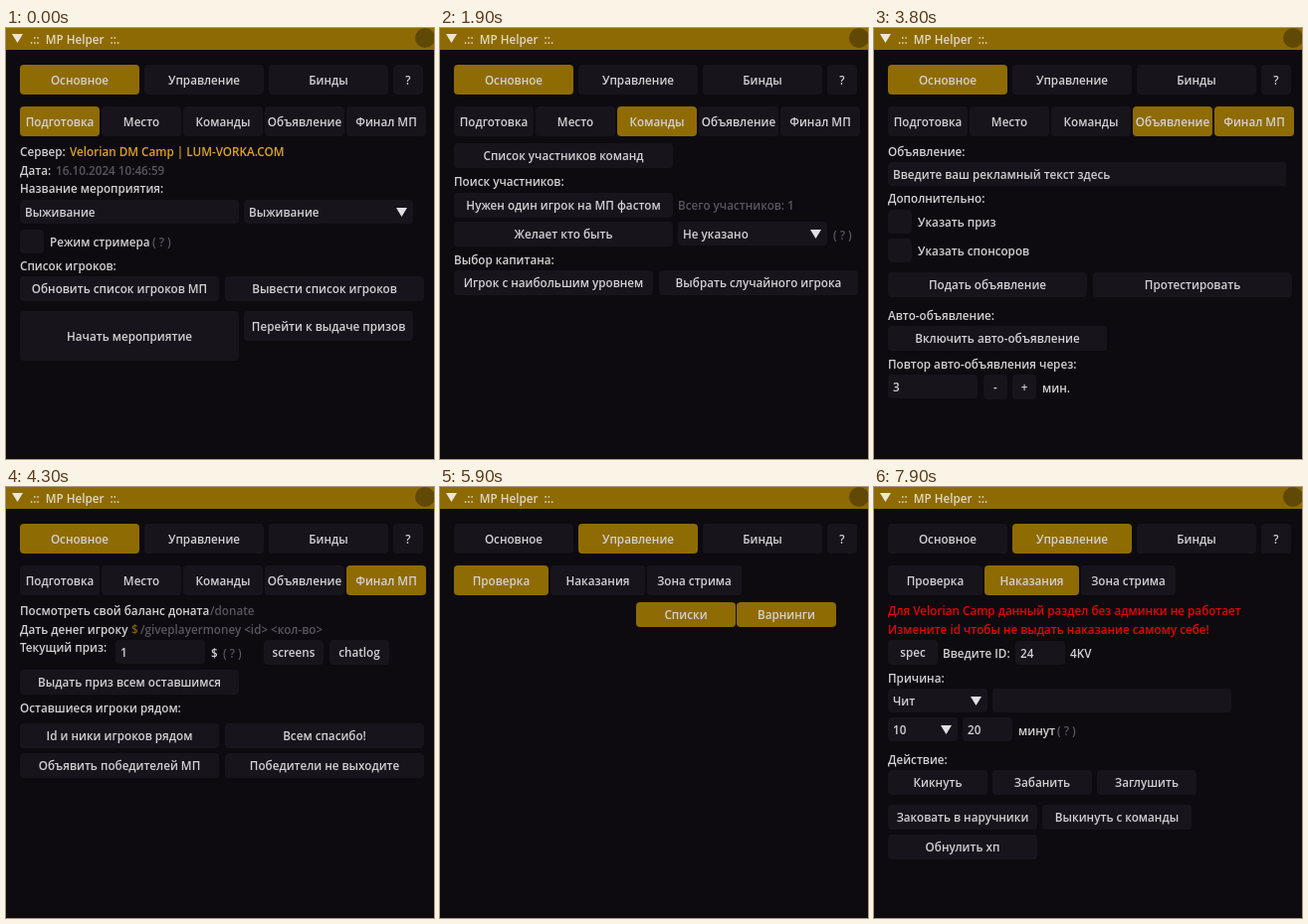
Write an HTML page that moves like this. It is 430 px wide and 434 px high and loops after 8000 ms.

```html
<!DOCTYPE html>
<html lang="ru">
<head>
<meta charset="utf-8">
<title>MP Helper</title>
<style>
html, body { margin: 0; width: 100%; height: 100%; overflow: hidden; background: #0d0b10; }
#stage { position: relative; width: 430px; height: 434px; overflow: hidden; background: #0d0b10;
  font: 600 11.7px/16px "Open Sans", "Noto Sans", sans-serif; color: #d2d0d2; }
#stage div { position: absolute; white-space: pre; }
#stage svg { position: absolute; left: 0; top: 0; }
.box { background: #17141c; border-radius: 4px; }
.btn { text-align: center; }
.page { left: 0; top: 0; width: 430px; height: 434px; }
</style>
</head>
<body>
<div id="stage"></div>
<script>
const LOOP = 8000, FADE = 200, STEP = 100;
const DARK = [23, 20, 28], GOLD = [143, 107, 4], LIGHT = [150, 147, 152];
const DIM = '#59565e', AMBER = '#dda51f', RED = '#e80404';
const stage = document.getElementById('stage');
const tabs = [], pages = [];
let root = stage;

function add(cls, x, y, w, h, str = '') {
  const el = document.createElement('div');
  el.className = cls;
  el.style.cssText = `left:${x}px;top:${y}px;width:${w}px;height:${h}px;line-height:${h}px`;
  el.textContent = str;
  root.append(el);
  return el;
}

// y is the middle of the line
function text(x, y, str, color = '') {
  const el = add('', x, y - 8, 0, 16, str);
  el.style.color = color;
  return el;
}

function shape(d, attrs) {
  root.insertAdjacentHTML('beforeend',
    `<svg width="430" height="434"><path d="${d}" ${attrs}/></svg>`);
}

const button = (x, y, w, str, h = 25) => add('box btn', x, y, w, h, str);
const hint = (x, y) => text(x, y, '( ? )', DIM);
const arrow = (x, y) => shape(`M${x - 5} ${y - 4}h11l-5.5 9z`, 'fill="#e2e0e2"');

function input(x, y, w, str) {
  add('box', x, y, w, 24);
  text(x + 5, y + 12, str);
}

function combo(x, y, w, str) {
  input(x, y, w, str);
  arrow(x + w - 12, y + 12);
}

function check(y, str, on) {
  add('box', 14, y, 24, 24);
  if (on) shape(`M19 ${y + 13}l5 5l10 -12`, 'fill="none" stroke="#a87c0a" stroke-width="2.8"');
  text(44, y + 12, str);
}

function pair(y, left, right) {
  button(14, y, 200, left);
  button(220, y, 200, right);
}

// Gold from `on` to `off`, with a light flash at `press`
function tab(x, y, w, h, str, on = Infinity, off = Infinity, press = Infinity) {
  tabs.push({ el: button(x, y, w, str, h), on, off, press });
}

function page(from, to, build) {
  const el = add('page', 0, 0, 430, 434);
  pages.push({ el, from, to });
  const outer = root;
  root = el;
  build();
  root = outer;
}

// Title bar
add('', 0, 0, 430, 22).style.background = '#8d6a03';
add('', 411, 0, 20, 20).style.cssText += ';background:#604805;border-radius:50%';
shape('M6 6h11l-5.5 9z', 'fill="#ece6d8"');
text(24, 11, '.::  MP Helper  ::.', '#e0d8c4');

tab(14, 37, 120, 30, 'Основное', -FADE, 4900);
tab(139, 37, 120, 30, 'Управление', 4450, Infinity, 4750);
tab(264, 37, 120, 30, 'Бинды');
tab(389, 37, 30, 30, '?');

page(0, 4900, () => {
  tab(14, 79, 80, 30, 'Подготовка', -FADE, 1100);
  tab(96, 79, 80, 30, 'Место', 600, 1700, 1000);
  tab(178, 79, 80, 30, 'Команды', 1300, 3000, 1600);
  tab(260, 79, 80, 30, 'Объявление', 2300, 4000, 2900);
  tab(342, 79, 80, 30, 'Финал МП', 3500, Infinity, 3920);
});

let clock;
page(0, 1100, () => {
  text(14, 124, 'Сервер:');
  text(64, 124, 'Velorian DM Camp | LUM-VORKA.COM', AMBER);
  text(14, 143, 'Дата:');
  clock = text(50, 143, '', DIM);
  text(14, 161, 'Название мероприятия:');
  input(14, 173, 220, 'Выживание');
  combo(239, 173, 170, 'Выживание');
  check(203, 'Режим стримера');
  hint(147, 215);
  text(14, 239, 'Список игроков:');
  pair(250, 'Обновить список игроков МП', 'Вывести список игроков');
  button(14, 285, 220, 'Начать мероприятие', 50);
  button(239, 285, 170, 'Перейти к выдаче призов', 30);
});

page(1700, 3000, () => {
  button(14, 116, 220, 'Список участников команд');
  text(14, 154, 'Поиск участников:');
  button(14, 166, 220, 'Нужен один игрок на МП фастом');
  text(239, 178, 'Всего участников: 1', DIM);
  button(14, 195, 220, 'Желает кто быть');
  combo(239, 195, 150, 'Не указано');
  hint(395, 208);
  text(14, 233, 'Выбор капитана:');
  pair(244, 'Игрок с наибольшим уровнем', 'Выбрать случайного игрока');
});

page(3000, 4000, () => {
  text(14, 124, 'Объявление:');
  input(14, 135, 400, 'Введите ваш рекламный текст здесь');
  text(14, 171, 'Дополнительно:');
  check(183, 'Указать приз');
  check(212, 'Указать спонсоров');
  pair(246, 'Подать объявление', 'Протестировать');
  text(14, 289, 'Авто-объявление:');
  button(14, 300, 220, 'Включить авто-объявление');
  text(14, 338, 'Повтор авто-объявления через:');
  input(14, 349, 90, '3');
  button(110, 349, 24, '-');
  button(139, 349, 24, '+');
  text(169, 362, 'мин.');
});

page(4000, 4900, () => {
  text(14, 124, 'Посмотреть свой баланс доната');
  text(205, 124, '/donate', DIM);
  text(14, 143, 'Дать денег игроку');
  text(126, 143, '$', '#7d5f0c');
  text(135, 143, '/giveplayermoney <id> <кол-во>', DIM);
  text(14, 161, 'Текущий приз:');
  input(110, 154, 90, '1');
  text(206, 167, '$');
  hint(218, 167);
  button(259, 154, 60, 'screens');
  button(325, 154, 60, 'chatlog');
  button(14, 184, 220, 'Выдать приз всем оставшимся');
  text(14, 222, 'Оставшиеся игроки рядом:');
  pair(238, 'Id и ники игроков рядом', 'Всем спасибо!');
  pair(268, 'Объявить победителей МП', 'Победители не выходите');
});

page(4900, LOOP, () => {
  tab(14, 79, 95, 30, 'Проверка', 0, 7600);
  tab(111, 79, 95, 30, 'Наказания', 6750, Infinity, 7500);
  tab(208, 79, 95, 30, 'Зона стрима');
});

page(4900, 7600, () => {
  tab(197, 116, 100, 25, 'Списки', 0, 6100);
  tab(298, 116, 100, 25, 'Варнинги', 5600, Infinity, 6000);
});

page(6100, 7600, () => {
  check(141, 'Предупреждения на подозрительных игроков');
  text(14, 178, 'Проверять каждые');
  input(133, 170, 91, '10');
  button(229, 170, 24, '-');
  button(260, 170, 24, '+');
  text(292, 183, 'секунд');
  check(200, 'Проверять изменение хп и брони', true);
  input(14, 229, 50, '100');
  text(70, 241, 'хп');
  input(89, 229, 50, '100');
  text(145, 241, 'броня');
  hint(183, 241);
  check(258, 'Уведомлять при нанесении по вам урона', true);
  check(287, 'Уведомлять если игрок не в транспорте', true);
  check(316, 'Проверять на нахождение под картой(или в воде)', true);
  check(345, 'Проверять на нелегальное оружие', true);
  text(14, 381, 'Разрешенное оружие:');
  combo(14, 393, 150, 'Fists');
  button(169, 392, 70, 'Добавить');
  button(244, 392, 70, 'Удалить');
  button(319, 392, 70, 'Очистить');
});

page(7600, LOOP, () => {
  text(14, 124, 'Для Velorian Camp данный раздел без админки не работает', RED);
  text(14, 143, 'Измените id чтобы не выдать наказание самому себе!', RED);
  button(14, 154, 50, 'spec');
  text(69, 167, 'Введите ID:');
  input(142, 155, 50, '24');
  text(197, 167, '4KV');
  text(14, 192, 'Причина:');
  combo(14, 203, 100, 'Чит');
  input(119, 203, 240, '');
  combo(14, 232, 70, '10');
  input(89, 232, 50, '20');
  text(145, 245, 'минут');
  hint(184, 245);
  text(14, 274, 'Действие:');
  button(14, 285, 100, 'Кикнуть');
  button(119, 285, 100, 'Забанить');
  button(224, 285, 100, 'Заглушить');
  button(14, 320, 150, 'Заковать в наручники');
  button(169, 320, 150, 'Выкинуть с команды');
  button(14, 350, 150, 'Обнулить хп');
});

const ramp = (t, from, span) => Math.min(1, Math.max(0, (t - from) / span));
const mix = (a, b, k) => a.map((v, i) => v + (b[i] - v) * k);

function render(t) {
  for (const p of pages) p.el.style.display = t >= p.from && t < p.to ? '' : 'none';
  for (const { el, on, off, press } of tabs) {
    const gold = ramp(t, on, FADE) - ramp(t, off, FADE);
    const flash = ramp(t, press - 50, 50) - ramp(t, press + 100, FADE);
    el.style.backgroundColor = `rgb(${mix(mix(DARK, GOLD, gold), LIGHT, flash)})`;
  }
  clock.textContent = '16.10.2024 10:' + (t < 400 ? '46:59' : '47:00');
}

function frame(now) {
  render(Math.floor(now % LOOP / STEP) * STEP);
  requestAnimationFrame(frame);
}
render(0);
requestAnimationFrame(frame);
</script>
</body>
</html>
```
